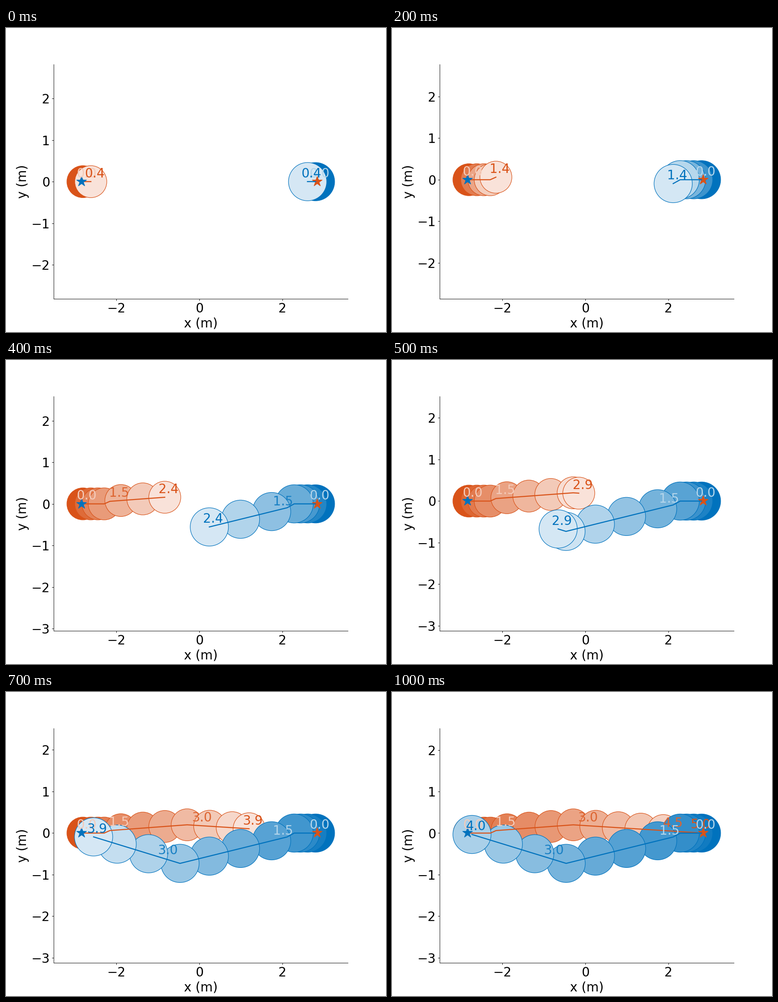
Animation of 837x669 px, one loop 2 s. Source, as a matplotlib script:

```python
import numpy as np
import matplotlib.pyplot as plt
from matplotlib.animation import FuncAnimation
from matplotlib.patches import Circle
from matplotlib.ticker import MultipleLocator

W, H, DPI = 837, 669, 83.7
FRAMES, INTERVAL = 20, 100
T_DODGE, T_CRUISE, T_TURN, T_END = 1.2, 1.4, 2.8, 5.0

plt.rcParams.update({
    "font.family": "DejaVu Sans",
    "font.size": 24,
    "axes.spines.top": False,
    "axes.spines.right": False,
})


class Agent:
    """Slows down, dodges, cruises to its turning point, heads for its goal."""

    def __init__(self, color, radius, side, dodge, turn, speed, stop):
        self.color, self.radius, self.side = color, radius, side
        self.dodge, self.turn = np.array(dodge), np.array(turn)
        self.speed, self.stop = speed, stop
        self.goal = np.array([-2.84 * side, 0])

    def approach(self, t):
        return np.array([self.side * (2.8 - 0.5 * t + 0.06 * t * t), 0])

    def position(self, t):
        if t <= T_DODGE:
            return self.approach(t)
        if t <= T_CRUISE:
            u = (t - T_DODGE) / (T_CRUISE - T_DODGE)
            return (1 - u) * self.approach(T_DODGE) + u * self.dodge
        if t < T_TURN - 1e-6:
            return toward(self.dodge, self.turn, self.speed * (t - T_CRUISE))
        return toward(self.turn, self.goal, 1.025 * self.speed * (t - T_TURN))


def toward(a, b, dist):
    """Point reached from a after going dist towards b, at most to b."""
    gap = b - a
    return a + gap * min(1, dist / np.hypot(*gap))


AGENTS = [
    Agent((0.85, 0.325, 0.098), 0.385, -1, dodge=(-2.15, 0.061),
          turn=(-0.29, 0.199), speed=1.325, stop=5.0),
    Agent((0, 0.447, 0.741), 0.46, 1, dodge=(2.118, -0.093),
          turn=(-0.462, -0.729), speed=1.93, stop=4.0),
]

# The hair of slack keeps the pixel size from rounding down.
fig = plt.figure(figsize=((W + 0.01) / DPI, (H + 0.01) / DPI), dpi=DPI,
                 facecolor="white")
ax = fig.add_axes([0.125, 0.1092, 0.775, 0.7707])


def tint(color, alpha):
    return tuple(1 - alpha * (1 - c) for c in color)


def every(step, stop):
    """Multiples of step that lie before stop."""
    return np.arange(0, stop - 1e-6, step)


def add_label(pos, t, color):
    ax.text(pos[0] - 0.15, pos[1] + 0.1, f"{t:.1f}", color=color)


def draw_agent(agent, now):
    color = agent.color
    last = min(now, agent.stop)
    fade = 1.2 * now

    trail = [agent.position(t) for t in np.append(every(0.1, last), last)]
    ax.plot(*np.transpose(trail), color=color, lw=2)
    ax.plot(*agent.goal, color=color, marker="*", markersize=20)

    for t in np.append(every(0.4, last), last):
        ax.add_patch(Circle(agent.position(t), agent.radius,
                            fc=tint(color, 1 - t / fade), ec=color, lw=1))

    for t in every(1.5, last):
        alpha = 0.3 if t / fade < 0.5 else 0.9
        add_label(agent.position(t), t, tint(color, alpha))
    add_label(agent.position(last), last, color)


def fit_view():
    """Equal axes: 5% margin in x, y centred on the data."""
    box = ax.dataLim
    half_w = 0.55 * box.width
    half_h = half_w * ax.bbox.height / ax.bbox.width
    cx, cy = (box.x0 + box.x1) / 2, (box.y0 + box.y1) / 2
    ax.set_xlim(cx - half_w, cx + half_w)
    ax.set_ylim(cy - half_h, cy + half_h)


def draw(i):
    ax.clear()
    now = min(0.4 + 0.5 * i, T_END)
    for agent in AGENTS:
        draw_agent(agent, now)
    fit_view()
    ax.xaxis.set_major_locator(MultipleLocator(2))
    ax.yaxis.set_major_locator(MultipleLocator(1))
    ax.set_xlabel("x (m)")
    ax.set_ylabel("y (m)")
    return []


anim = FuncAnimation(fig, draw, frames=FRAMES, interval=INTERVAL,
                     repeat=True, repeat_delay=0, blit=False)
plt.show()
```
